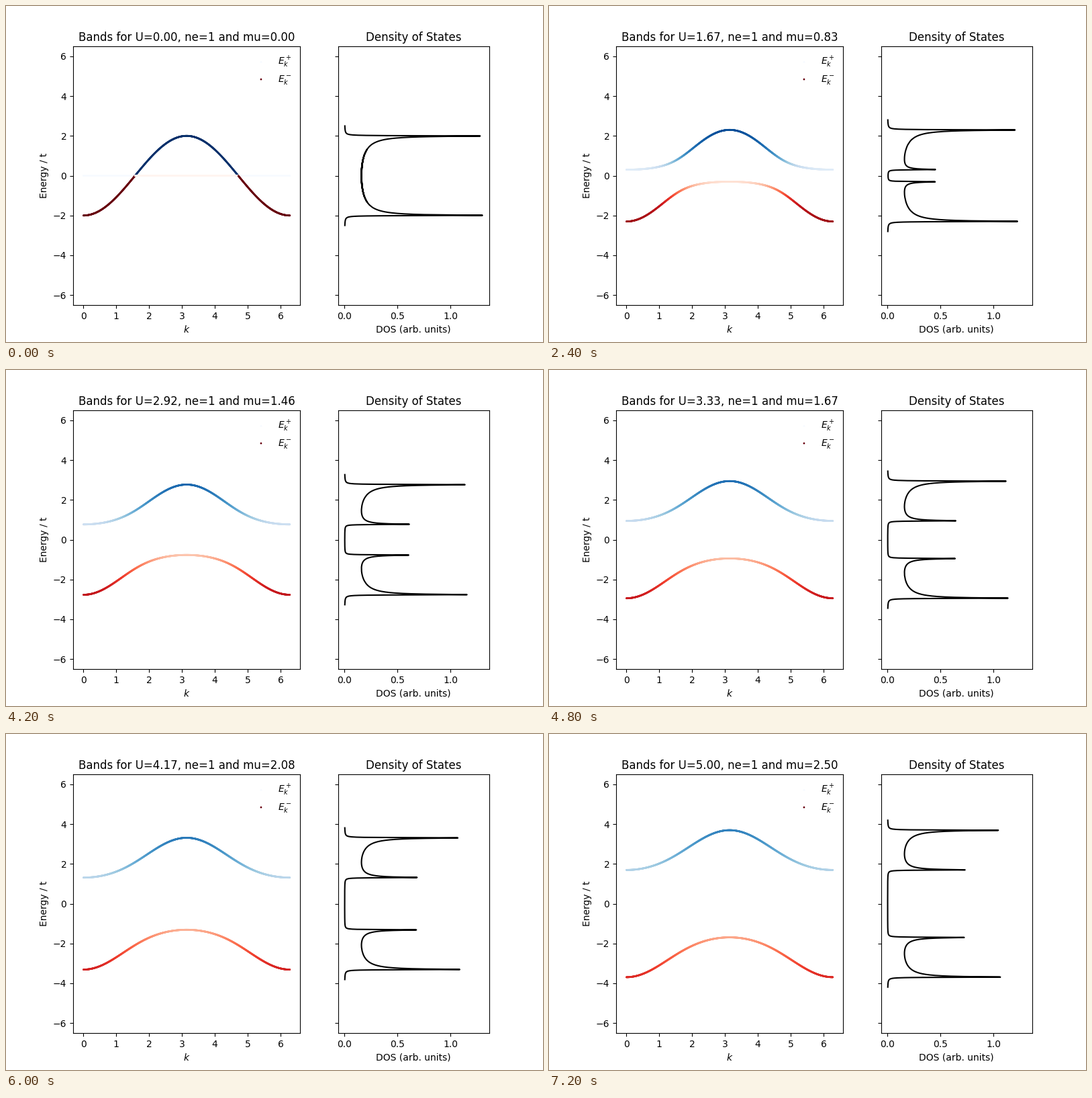
A matplotlib script for the animation above (7.5 s loop, 800 px wide and 500 px high).

```python
import numpy as np
import matplotlib.pyplot as plt
from matplotlib.animation import FuncAnimation

FRAMES = 25
ETA = 0.01  # Lorentzian broadening
NE = 1

k = np.linspace(0, 2 * np.pi, 1000)
eps = -2 * np.cos(k)
U_values = np.linspace(0, 5, FRAMES)


def bands(U):
    """Hubbard-I bands relative to mu = U/2, with their spectral weights."""
    root = np.sqrt(eps**2 + U**2)
    upper, lower = (eps + root) / 2, (eps - root) / 2
    weight = (1 + eps / root) / 2
    return (upper, weight), (lower, 1 - weight)


def density(pair):
    """Broadened density of states on a grid reaching past the band edges."""
    (upper, _), (lower, _) = pair
    w = np.linspace(lower.min() - 0.5, upper.max() + 0.5, 1500)
    dos = np.zeros_like(w)
    for energy, weight in pair:
        dos += (ETA / np.pi / ((w[:, None] - energy) ** 2 + ETA**2)) @ weight
    return dos / k.size, w


def title(U):
    return f"Bands for U={U:.2f}, ne={NE} and mu={U * NE / 2:.2f}"


fig, (ax, ax_dos) = plt.subplots(
    1, 2, sharey=True, figsize=(8, 5), dpi=100,
    gridspec_kw={"width_ratios": [3, 2]},
)

start = bands(U_values[0])
styles = (("Blues", "$E_k^+$"), ("Reds", "$E_k^-$"))
dots = [
    ax.scatter(k, energy, c=weight, s=1, cmap=cmap, vmin=0, vmax=1, label=label)
    for (energy, weight), (cmap, label) in zip(start, styles)
]
ax.set_ylim(-6.5, 6.5)
ax.set_xlabel("$k$")
ax.set_ylabel("Energy / t")
heading = ax.set_title(title(U_values[0]))
ax.legend(loc="upper right", frameon=False)

dos_line, = ax_dos.plot(*density(start), color="black")
ax_dos.set_xlabel("DOS (arb. units)")
ax_dos.set_title("Density of States")

# Keep the limits found for U = 0 throughout.
for a in (ax, ax_dos):
    a.set_xlim(a.get_xlim())


def update(i):
    U = U_values[i]
    pair = bands(U)
    for dot, (energy, weight) in zip(dots, pair):
        dot.set_offsets(np.column_stack([k, energy]))
        dot.set_array(weight)
    dos_line.set_data(*density(pair))
    heading.set_text(title(U))
    return [*dots, dos_line, heading]


anim = FuncAnimation(fig, update, frames=FRAMES, interval=300, repeat=True)
plt.show()
```
